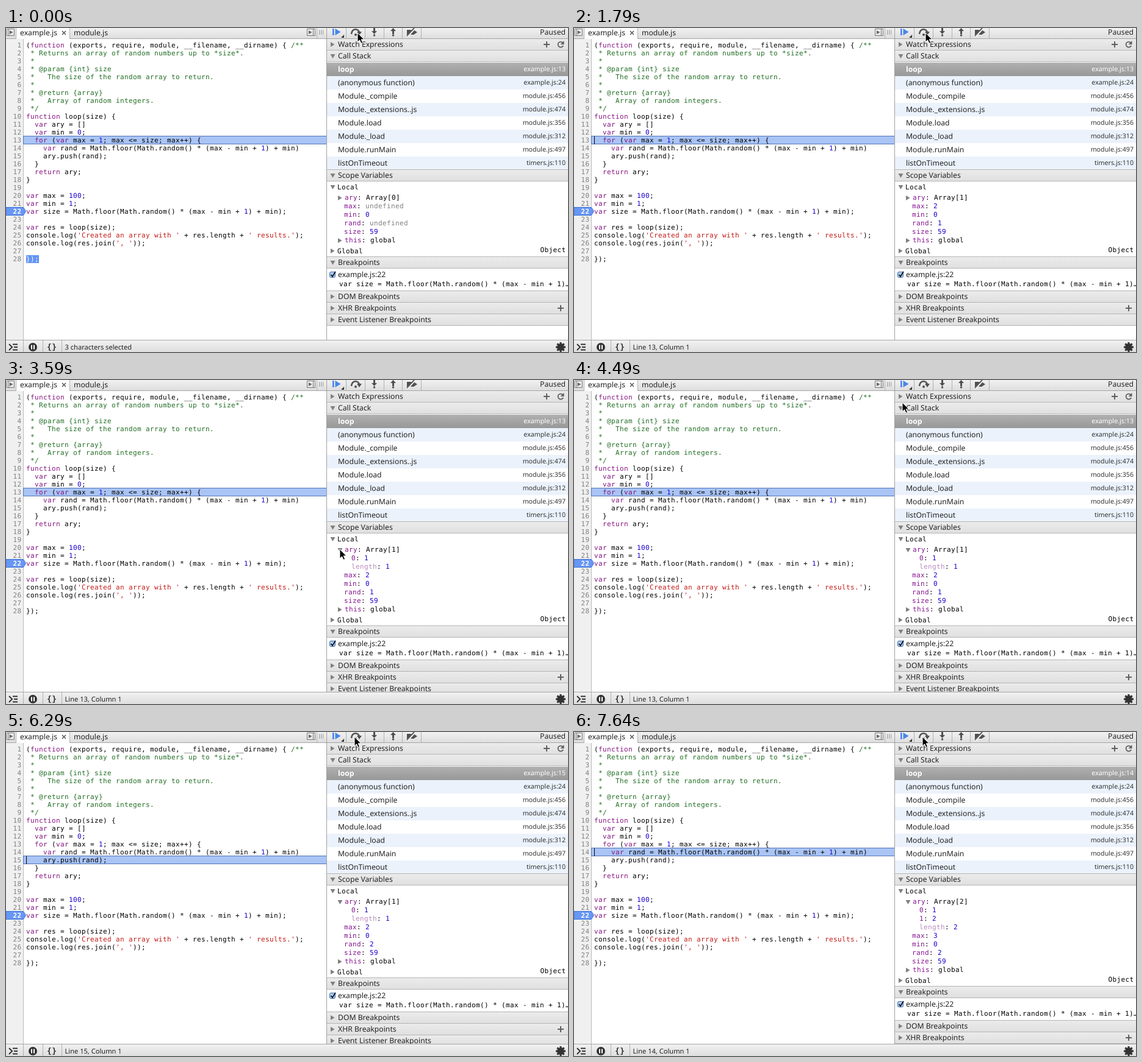
An HTML page that plays this animation: 921 px wide and 532 px high, repeating every 8 s.

```html
<!DOCTYPE html>
<html lang="en">
<head>
<meta charset="utf-8">
<title>Stepping through a loop</title>
<style>
  html, body { margin: 0; width: 100%; height: 100%; overflow: hidden; background: #fff; }
  svg { display: block; }
  text { white-space: pre; text-rendering: geometricPrecision; fill: #000; }
  .ui { font: 12.2px "Noto Sans", "Open Sans", sans-serif; fill: #222; }
  .small { font: 10.7px "Noto Sans", "Open Sans", sans-serif; fill: #333; }
  .status { font: 11.1px "Noto Sans", "Open Sans", sans-serif; fill: #222; }
  .mono { font: 11px "DejaVu Sans Mono", monospace; letter-spacing: .378px; }
  .end { text-anchor: end; }
  .bold { font-weight: bold; }
  .white { fill: #fff; }
  .gutter { fill: #808080; }
  .kw { fill: #85157f; }
  .com { fill: #236e25; }
  .str { fill: #c41a16; }
  .num { fill: #1c00cf; }
  .name { fill: #881391; }
  .dim { fill: #b98abd; }
  .undef { fill: #808080; }
</style>
</head>
<body>
<svg id="stage" width="921" height="532" viewBox="0 0 921 532">
  <defs>
    <linearGradient id="bar" x2="0" y2="1"><stop stop-color="#f1f1f1"/><stop offset="1" stop-color="#dedede"/></linearGradient>
    <linearGradient id="head" x2="0" y2="1"><stop stop-color="#ebebeb"/><stop offset="1" stop-color="#e0e0e0"/></linearGradient>
    <linearGradient id="pick" x2="0" y2="1"><stop stop-color="#b0b0b0"/><stop offset="1" stop-color="#989898"/></linearGradient>
  </defs>
  <g id="code"></g>
  <g id="panel"></g>
  <g id="chrome"></g>
  <path id="mouse" d="M0 0V15L3.6 11.8L6 17.3L8.6 16.2L6.2 10.8H11Z" stroke="#fff"/>
</svg>
<script>
const LOOP = 8000, OPEN = 3290, BLUR = 3590, REFOCUS = 5690;

const source = `(function (exports, require, module, __filename, __dirname) { /**
 * Returns an array of random numbers up to *size*.
 *
 * @param {int} size
 *   The size of the random array to return.
 *
 * @return {array}
 *   Array of random integers.
 */
function loop(size) {
  var ary = []
  var min = 0;
  for (var max = 1; max <= size; max++) {
    var rand = Math.floor(Math.random() * (max - min + 1) + min)
    ary.push(rand);
  }
  return ary;
}

var max = 100;
var min = 1;
var size = Math.floor(Math.random() * (max - min + 1) + min);

var res = loop(size);
console.log('Created an array with ' + res.length + ' results.');
console.log(res.join(', '));

});`.split('\n');

const stack = [['(anonymous function)', 'example.js:24'], ['Module._compile', 'module.js:456'],
  ['Module._extensions..js', 'module.js:474'], ['Module.load', 'module.js:356'],
  ['Module._load', 'module.js:312'], ['Module.runMain', 'module.js:497'],
  ['listOnTimeout', 'timers.js:110']];

// time, paused line, array length, max, rand
const steps = [
  [0, 13, 0], [300, 14, 0, 1], [1200, 15, 0, 1, 1], [1790, 13, 1, 2, 1],
  [5690, 14, 1, 2, 1], [6140, 15, 1, 2, 2], [6890, 13, 2, 3, 2], [7490, 14, 2, 3, 2]];

// time, x, y: the pointer is sampled, so it jumps
const moves = [
  [0, 576, 8], [1940, 573, 32], [2090, 561, 105], [2240, 546, 195], [2390, 536, 262], [2540, 534, 281],
  [2690, 538, 282], [2840, 544, 281], [2990, 547, 278], [4040, 547, 265], [4190, 544, 195], [4340, 540, 100],
  [4490, 538, 37], [4640, 547, 20], [4790, 562, 9], [4940, 573, 3], [5090, 573, 6], [5240, 571, 8]];

const $ = id => document.getElementById(id);
const latest = (list, t) => list.findLast(item => item[0] <= t);
const rect = (x, y, w, h, fill, extra = '') =>
  `<rect x="${x}" y="${y}" width="${w}" height="${h}" fill="${fill}" ${extra}/>`;
const path = (d, fill, stroke = 'none', width = 1) =>
  `<path d="${d}" fill="${fill}" stroke="${stroke}" stroke-width="${width}"/>`;
const text = (x, mid, s, cls) => `<text x="${x}" y="${mid + 4}" class="${cls}">${s}</text>`;
const span = (cls, s) => `<tspan class="${cls}">${s}</tspan>`;
const right = (x, y) => path(`M${x} ${y - 4}v8l6.5 -4z`, '#808080');
const down = (x, y) => path(`M${x - .5} ${y - 3}h8l-4 7z`, '#808080');
const plus = (x, y) => path(`M${x - 5} ${y}h10M${x} ${y - 5}v10`, 'none', '#606060', 2);
const lineY = n => 28 + 13 * (n - 1);

function paint(line) {
  return line.replace(/</g, '&lt;').replace(
    /(\/\*.*|^ \*.*)|('[^']*')|\b(function|var|for|return)\b|\b(\d+)\b/g,
    (s, com, str, kw) => span(com ? 'com' : str ? 'str' : kw ? 'kw' : 'num', s));
}

function drawCode(line, caret, selected) {
  let out = rect(0, 18, 28, 495, '#f0f0f0') + rect(28, 18, 1, 495, '#bbb');
  const y = lineY(line) - 7;
  out += rect(28, y, 498, 14, '#4f74b8') + rect(29, y + 1, 497, 12, '#a9c4f5');
  const mark = lineY(22);
  out += path(`M0 ${mark - 6.5}H28.5L32.5 ${mark}L28.5 ${mark + 6.5}H0Z`, '#6797f5', '#3f6fd0');
  if (selected) out += rect(33, lineY(28) - 6, 21, 13, '#6394f6');
  source.forEach((s, i) => {
    const n = i + 1, mid = lineY(n);
    out += text(25.4, mid, n, 'mono end ' + (n == 22 ? 'white bold' : 'gutter'));
    out += text(33, mid, paint(s), 'mono' + (selected && n == 28 ? ' white' : ''));
  });
  return caret ? out + rect(33, y + 1, 1, 13, '#000') : out;
}

function header(mid, title, open) {
  return rect(526, mid - 10, 395, 20, '#b5b5b5') + rect(526, mid - 9, 395, 18, 'url(#head)') +
    (open ? down : right)(532, mid) + text(544, mid, title, 'ui');
}

function drawPanel(line, len, max, rand, open) {
  let out = header(27, 'Watch Expressions') + header(46, 'Call Stack', true) + plus(886, 27) +
    path('M912.8 24.5A4.5 4.5 0 1 0 913.2 29', 'none', '#606060', 1.8) + path('M914.5 21v6h-6z', '#606060');
  out += rect(526, 57, 395, 22, 'url(#pick)') + text(544, 68, 'loop', 'ui bold white') +
    text(917, 66.5, 'example.js:' + line, 'small end white');
  stack.forEach(([name, place], i) => {
    const mid = 90 + 22 * i;
    if (i % 2 == 0) out += rect(526, mid - 11, 395, 22, '#ebf2fc');
    out += text(544, mid, name, 'ui') + text(917, mid - 1.5, place, 'small end');
  });
  out += header(242, 'Scope Variables', true) + down(532, 261) + text(543, 261, 'Local', 'mono');

  let y = 278;
  const row = (x, name, value, cls = 'num', nameCls = 'name') => {
    out += text(x, y, span(nameCls, name) + ': ' + span(cls, value), 'mono');
    y += 14;
  };
  const maybe = (name, v) => v === undefined ? row(554, name, 'undefined', 'undef') : row(554, name, v);
  out += (open ? down : right)(544, y + 1);
  row(555, 'ary', `Array[${len}]`, '');
  if (open) {
    for (let i = 0; i < len; i++) row(566, i, i + 1);
    row(566, 'length', len, 'num', 'dim');
  }
  maybe('max', max);
  row(554, 'min', 0);
  maybe('rand', rand);
  row(554, 'size', 59);
  out += right(544, y + 1);
  row(555, 'this', 'global', '');

  const end = y + 4;
  out += right(532, end) + text(543, end, 'Global', 'mono') + text(917.4, end - 2, 'Object', 'mono end');
  out += header(end + 19, 'Breakpoints', true);
  const box = end + 39;
  out += rect(530.5, box - 4.5, 9, 9, '#a9cdf6', 'rx="2" stroke="#3d69a8"') +
    path(`M532.5 ${box}l2.5 3l5 -8`, 'none', '#111', 1.8) + text(544, box, 'example.js:22', 'ui') +
    text(546, box + 15, 'var size = Math.floor(Math.random() * (max - min + 1)…', 'mono');
  ['DOM Breakpoints', 'XHR Breakpoints', 'Event Listener Breakpoints']
    .forEach((s, i) => out += header(end + 75 + 19 * i, s));
  return out + plus(909, end + 94);
}

function drawChrome(status) {
  const dark = '#505050';
  let out = rect(0, 0, 921, 17, 'url(#bar)') + rect(0, 17, 921, 1, '#a5a5a5') +
    rect(17, 0, 87, 18, '#fff') + rect(525, 0, 1, 513, '#a0a0a0');
  [16, 104, 509, 557, 588, 619, 649, 680].forEach(x => out += rect(x, 0, 1, 17, '#b0b0b0'));
  out += text(23, 8, 'example.js', 'ui') + text(111, 8, 'module.js', 'ui') + text(917, 7, 'Paused', 'ui end') +
    path('M92 5l6 6m0 -6l-6 6', 'none', '#555', 1.5);

  // navigator toggles and grip
  out += path('M1.5 1.5h12v11h-12zM4.5 1.5v11M493.5 1.5h13v11h-13zM503.5 1.5v11', 'none', '#777') +
    path('M6 4l5.5 3l-5.5 3zM496 4l5.5 3l-5.5 3z', '#666') +
    path('M513.5 3v8M516.5 3v8M519.5 3v8', 'none', '#999');

  // debugger buttons
  out += path('M535 1h2.5v11h-2.5zM539.5 1l9 5.5l-9 5.5z', '#4a84e8') + path('M554 11v5h-5z', '#333') +
    path('M566 10C567 0 578 0 579 8', 'none', dark, 2.5) + path('M575 6h8l-4 6z', dark) +
    `<circle cx="573" cy="11" r="2" fill="${dark}"/>` +
    path('M602 0h3v5h3l-4.500 5l-4.500 -5h3zM633 10h3v-5h3l-4.500 -5l-4.500 5h3z', dark) +
    `<circle cx="603.500" cy="12" r="1.700" fill="${dark}"/><circle cx="634.500" cy="12" r="1.700" fill="${dark}"/>` +
    path('M657 3h11l6 4l-6 4h-11z', dark) + path('M658 14L670 0', 'none', '#eee', 3.5) +
    path('M657 13L669 0', 'none', dark, 1.8);

  // status bar
  out += rect(0, 512, 921, 20, '#a5a5a5') + rect(0, 513, 921, 19, 'url(#bar)');
  [28, 60, 91].forEach(x => out += rect(x, 513, 1, 19, '#b0b0b0'));
  out += path('M5 519l5 5l-5 5M11 519.500h8M13 524h6M11 528.500h8', 'none', '#333', 2) +
    '<circle cx="44" cy="524" r="7" fill="#333"/>' + path('M42 520.500v7M46 520.500v7', 'none', '#fff', 2) +
    `<text x="67" y="528" class="mono bold" style="font-size:13px;fill:#333">{}</text>` +
    text(96.5, 524, status, 'status');
  for (let a = 0; a < 180; a += 45)
    out += rect(907.5, 516, 3, 16, '#333', `transform="rotate(${a} 909 524)"`);
  return out + '<circle cx="909" cy="524" r="4" fill="none" stroke="#333" stroke-width="4"/>';
}

const shown = {};
function put(id, html) {
  if (shown[id] !== html) $(id).innerHTML = shown[id] = html;
}

function frame(now) {
  const t = now % LOOP;
  const [since, line, len, max, rand] = latest(steps, t);
  const [, x, y] = latest(moves, t);
  const selected = since == 0;
  const focused = !selected && (t < BLUR || t >= REFOCUS);
  const caret = focused && Math.floor((t - since) / 600) % 2 == 0;
  put('code', drawCode(line, caret, selected));
  put('panel', drawPanel(line, len, max, rand, t >= OPEN));
  put('chrome', drawChrome(selected ? '3 characters selected' : `Line ${line}, Column 1`));
  $('mouse').setAttribute('transform', `translate(${x} ${y})`);
  requestAnimationFrame(frame);
}
frame(0);
</script>
</body>
</html>
```
